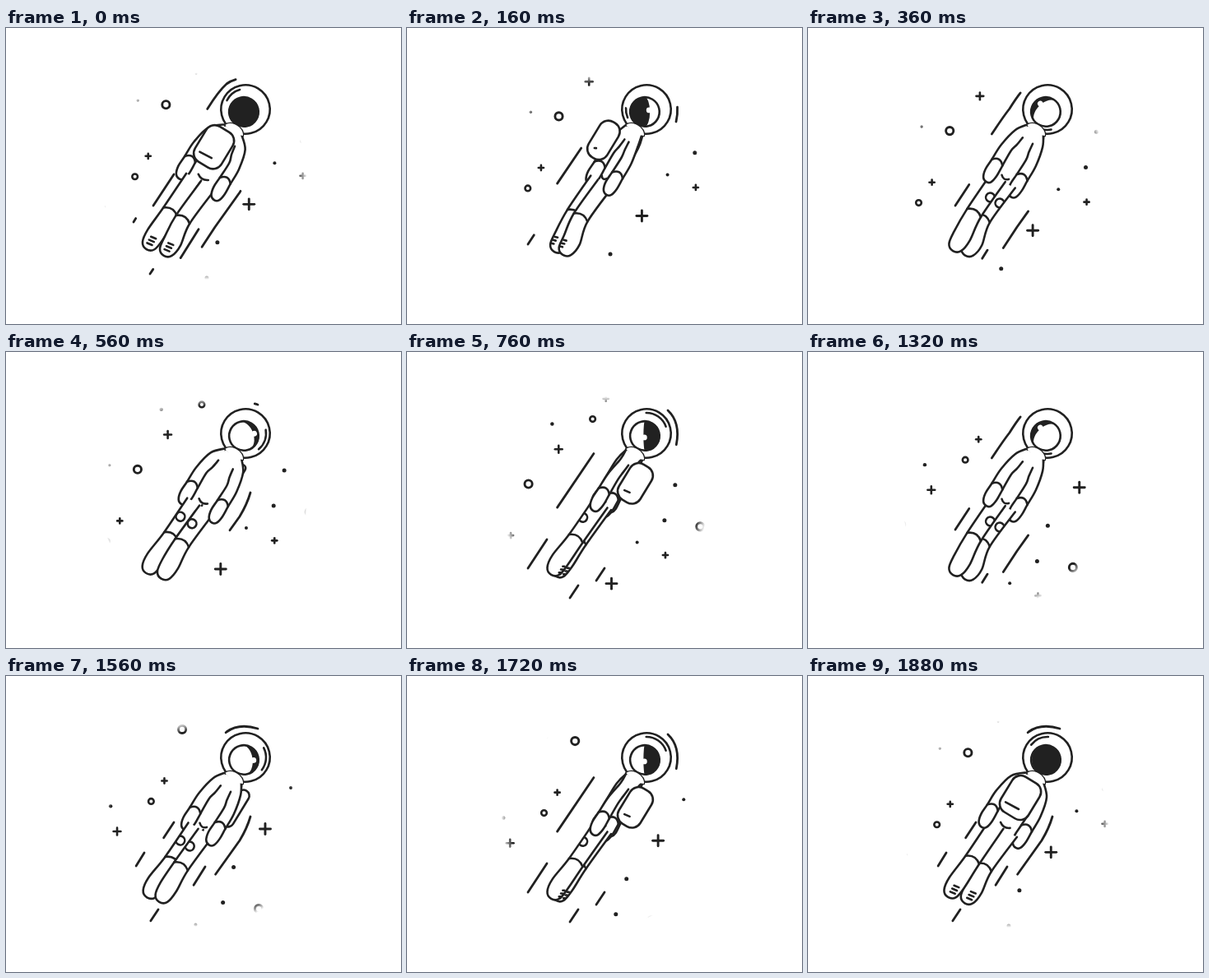
Animation, 480 px wide and 360 px high, one loop 1.92 s. Source, as an HTML page with a canvas:

```html
<!DOCTYPE html>
<html>
<head>
<meta charset="utf-8">
<style>
html, body { margin: 0; width: 100%; height: 100%; overflow: hidden; background: #fff; }
canvas { display: block; }
</style>
</head>
<body>
<canvas id="stage" width="480" height="360"></canvas>
<script>
const g = document.getElementById('stage').getContext('2d');
const INK = '#212121', LOOP = 1920, STEP = 40;
const DRIFT = 1880, SPIN = 960, GUST = 320;   // periods of sky, body and speed lines
const TAU = Math.PI * 2, DEG = Math.PI / 180, TILT = 31.3 * DEG;
const { sin, cos, min, max, abs } = Math;

const mix = (a, b, k) => a + (b - a) * k;
const clamp = (v, lo, hi) => max(lo, min(hi, v));

// Smooth curve through points
function trace(points) {
  const at = i => points[clamp(i, 0, points.length - 1)];
  g.beginPath();
  g.moveTo(...points[0]);
  for (let i = 0; i < points.length - 1; i++) {
    const [a, b, c, d] = [at(i - 1), at(i), at(i + 1), at(i + 2)];
    g.bezierCurveTo(b[0] + (c[0] - a[0]) / 6, b[1] + (c[1] - a[1]) / 6,
      c[0] - (d[0] - b[0]) / 6, c[1] - (d[1] - b[1]) / 6, ...c);
  }
}

function paint() {
  g.fillStyle = '#fff';
  g.fill();
  g.stroke();
}

function circle(x, y, r) {
  g.beginPath();
  g.arc(x, y, r, 0, TAU);
}

function line(x1, y1, x2, y2) {
  g.beginPath();
  g.moveTo(x1, y1);
  g.lineTo(x2, y2);
  g.stroke();
}

// Arc between two points of equal height, control point at top
function arch(x1, x2, y, top) {
  g.beginPath();
  g.moveTo(x1, y);
  g.quadraticCurveTo((x1 + x2) / 2, top, x2, y);
  g.stroke();
}

// Stars cross a soft-edged disc: kind, radius, sideways offset, time at mid-crossing
const stars = [
  ['plus', 6.5, 65, 31], ['plus', 4.4, -81, 935], ['plus', 3.1, -69, 1708], ['plus', 3.1, 99, 641],
  ['ring', 4.6, -87, 419], ['ring', 4.6, 114, 1130], ['ring', 3.3, -68, 1433],
  ['dot', 2.5, 74, 957], ['dot', 2.5, 60, 1354], ['dot', 2, 62, 577],
  ['dot', 2.2, -105, 1127], ['dot', 1.7, -118, 277]
];

function drawStar(kind, r, x, y) {
  g.lineWidth = r > 4.5 ? 2.9 : 2.6;
  if (kind === 'plus') {
    line(x - r, y, x + r, y);
    line(x, y - r, x, y + r);
    return;
  }
  circle(x, y, r);
  g.fillStyle = INK;
  if (kind === 'ring') g.stroke(); else g.fill();
}

function drawSky(t) {
  for (const [kind, r, side, mid] of stars) {
    const dt = (t - mid + DRIFT) % DRIFT;
    for (const s of [dt * 0.1078, (dt - DRIFT) * 0.1078])
      drawStar(kind, r, 240 + 0.821 * side - 0.571 * s, 180 + 0.571 * side + 0.821 * s);
  }
  const edge = g.createRadialGradient(240, 180, 114, 240, 180, 126);
  edge.addColorStop(0, '#fff0');
  edge.addColorStop(1, '#fff');
  g.fillStyle = edge;
  g.fillRect(0, 0, 480, 360);
}

// Speed lines: path, length, time the head sets off, time the tail follows
const lanes = [
  ['M306 64Q283 57 268 68Q258 77 245 98Q238 107 228 122L182 190', 188, 236, 280, 0.93, 0.68],
  ['M297 171Q293 185 284 200L254 242L237 268', 114, 170, 280],
  ['M317 71Q333 86 327 114', 48, 60, 122],
  ['M204 178l-25 38', 46, 250, 340],
  ['M168 215l-13 21', 25, 255, 294],
  ['M242 232l-32 51', 57, 245, 300],
  ['M185 284l-10 15', 18, 258, 305],
  ['M170 228l-23 35', 42, 64, 122],
  ['M240 263l-10 15', 18, 95, 122],
  ['M208 284l-10 15', 18, 95, 122]
].map(([d, ...rest]) => [new Path2D(d), ...rest]);

function drawLanes(t) {
  g.lineWidth = 2.8;
  for (const [path, len, go, follow, headSpeed = 0.75, tailSpeed = 0.75] of lanes) {
    const dt = (t - go + GUST) % GUST;
    const head = min(len, dt * headSpeed), tail = max(0, (dt - follow + go) * tailSpeed);
    if (tail >= head) continue;
    g.setLineDash([head - tail, 999]);
    g.lineDashOffset = -tail;
    g.stroke(path);
  }
  g.setLineDash([]);
}

// The body lives in a tilted frame: helmet at the origin, y towards the feet.
// c and s are cosine and sine of the turn; side is +1 or -1 for the two limbs.

function drawTorso(c) {
  const w = 14 + 8 * c * c;
  trace([[-10, 28], [-w, 46], [-w, 80], [1 - w, 104], [w - 1, 104], [w, 80], [w, 46], [12, 28]]);
  paint();
}

function drawArm(side, c) {
  const x = 25 * c * side - 1;
  const edge = e => {
    const out = (1 + e * clamp(x / 8, -1, 1)) / 2;   // 1 on the outer edge
    return [
      [mix(0.8 * x + 7 * e, 11 * e, out), mix(45, 28, out)],
      [0.88 * x + mix(7, 4, out) * e, mix(56, 42, out)],
      [x + 7 * e, 66], [x + 7.5 * e, 87]
    ];
  };
  const palm = [[x - 8, 101], [x - 5, 111], [x + 1, 114], [x + 6, 111], [x + 8, 101]];
  trace([...edge(-1), ...palm, ...edge(1).reverse()]);
  paint();
  arch(x - 7.5, x + 7.5, 87, 78);
}

function drawLeg(side, c, s) {
  const lean = c * side;
  const hip = 10 * lean - 1, shin = 9 * lean - 4.5, foot = 11 * lean + 3.5 * s - 3.5;
  const drop = -0.2 * foot;
  trace([
    [hip - 10, 104], [shin - 9.7, 154], [foot - 11, 184 + drop], [foot - 8.5, 200 + drop],
    [foot, 205 + drop], [foot + 8.5, 200 + drop], [foot + 11, 184 + drop], [shin + 9.7, 154], [hip + 10, 102]
  ]);
  paint();
  if (c < 0.3) {
    g.save();
    g.clip();
    circle((hip + shin) / 2 + 8 * s, 127.5, 5.4);
    g.stroke();
    g.restore();
  }
  arch(shin - 9.7, shin + 9.7, 154, 146);
  const half = 3.2 * c, mark = foot - 8 * s;
  if (half > 0.6)
    for (const y of [189, 193.5, 198]) line(mark - half, y + drop, mark + half, y + drop - 1);
}

function drawPack(turn) {
  const c = cos(turn), x = -25 * sin(turn) - 0.5;
  const w = c > 0 ? 13 + 6.5 * c * c : max(4, 13 + 14 * c);
  g.beginPath();
  g.roundRect(x - w, 34, 2 * w, 50, min(w, 12));
  paint();
  const half = 1.3 * (w - 12.5);
  if (half > 0) line(x - 3.5 - half, 73, x - 3.5 + half, 72);
}

function drawHead(turn) {
  const s = sin(turn), R = 17.8;
  circle(0, 0, 29.7);
  paint();

  // hair: a half disc whose inner edge swells and shrinks while it swings over the top
  const k = clamp((turn / DEG - 80) / 165, 0, 1);
  const swell = 0.85 * cos(turn) + 0.15 * cos(2 * turn);
  g.save();
  g.translate(-0.2, 3.6);
  circle(0, 0, R);
  paint();
  g.rotate(Math.PI * (1 + k * k * (3 - 2 * k)) - TILT);
  g.beginPath();
  g.arc(0, 0, R, -TAU / 4, TAU / 4);
  g.ellipse(0, 0, abs(swell) * R, R, 0, TAU / 4, TAU * 3 / 4, swell < 0);
  g.fillStyle = INK;
  g.fill();
  if (abs(swell) < 0.85) {
    circle(1 - swell * R, 2, 3.4);
    g.fillStyle = '#fff';
    g.fill();
  }
  g.restore();

  const mid = 230 * DEG - turn - TILT, span = (24 - 12 * s) * DEG;
  g.beginPath();
  g.arc(0, 0, 25, mid - span, mid + span);
  g.stroke();

  // collar
  g.beginPath();
  g.moveTo(-11, 29);
  g.bezierCurveTo(-8, 20, 10, 20, 14, 29);
  g.stroke();
  g.lineTo(2, 34);
  g.fillStyle = '#fff';
  g.fill();
}

function drawAstronaut(t) {
  const turn = t / SPIN * TAU, c = cos(turn), s = sin(turn);
  const near = s >= 0 ? 1 : -1, packTurn = turn + 20 * DEG, packBehind = cos(packTurn) < 0;
  g.save();
  g.translate(291, 99);
  g.rotate(TILT);
  g.lineWidth = 2.6;
  if (packBehind) drawPack(packTurn);
  drawTorso(c);
  drawArm(-near, c);
  drawLeg(-near, c, s);
  drawLeg(near, c, s);
  arch(-1 - 7 * abs(c), -1 + 7 * abs(c), 97, 102);
  drawArm(near, c);
  drawHead(turn);
  if (!packBehind) drawPack(packTurn);
  g.restore();
}

const start = performance.now();
function frame() {
  const t = Math.floor((performance.now() - start) % LOOP / STEP) * STEP;
  g.fillStyle = '#fff';
  g.fillRect(0, 0, 480, 360);
  g.strokeStyle = INK;
  g.lineCap = g.lineJoin = 'round';
  drawSky(t % DRIFT);
  drawLanes(t % GUST);
  drawAstronaut(t % SPIN);
  requestAnimationFrame(frame);
}
frame();
</script>
</body>
</html>
```
